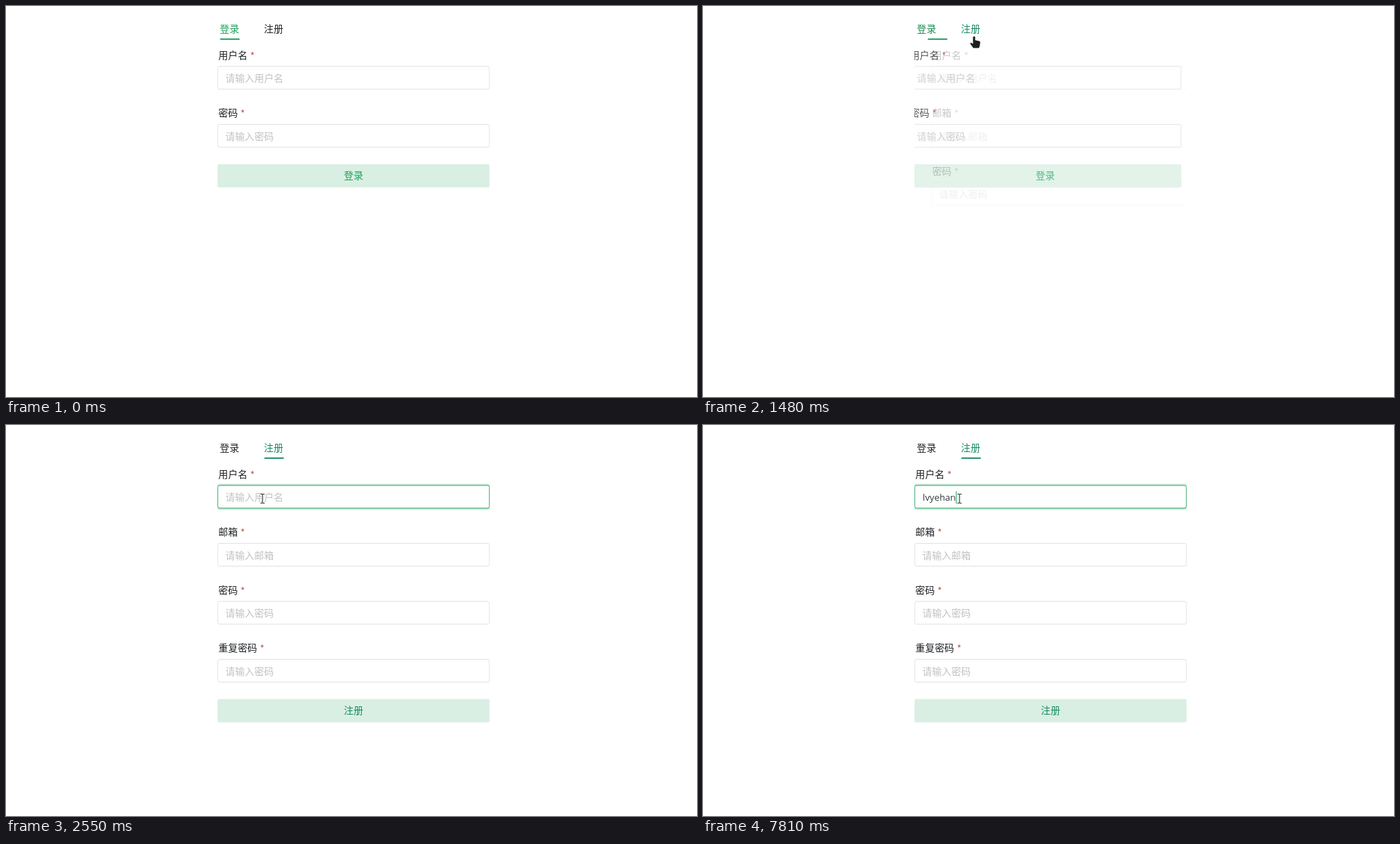
Animation of 994x563 px, one loop 8 s. Source, as an HTML page:

```html
<!DOCTYPE html>
<html lang="zh-CN">
<head>
<meta charset="utf-8">
<title>登录 / 注册</title>
<style>
  html, body { margin: 0; width: 100%; height: 100%; overflow: hidden; background: #fff; }
  #stage { position: relative; width: 994px; height: 563px; overflow: hidden; }
  #stage div, #stage svg { position: absolute; white-space: pre; }
  #page {
    left: 0; top: 0; width: 1000px; height: 566px;
    transform: scale(.994); transform-origin: 0 0;
    font: 14px/20px "Noto Sans CJK SC", "Noto Sans CJK", sans-serif; color: #1f2225;
  }
  .tab { top: 22px; }
  #bar { left: 309.5px; top: 47px; width: 28px; height: 2px; }
  #view { left: 306px; top: 61px; width: 394px; overflow: hidden; }
  .pane { left: 0; top: 0; width: 394px; height: 400px; }
  .label { left: 1.4px; }
  .star { position: relative; top: 1px; color: #c4564f; margin-left: 4px; }
  .input {
    left: 0; width: 394px; height: 34px; box-sizing: border-box;
    border: 1px solid #e0e0e6; border-radius: 3px;
  }
  .hint { left: 10.4px; top: 6px; color: #c2c2c2; }
  .button {
    left: 0; width: 394px; height: 34px; border-radius: 3px; background: #daefe3;
    text-align: center; line-height: 33px;
  }
  #typed { left: 11px; top: 6.5px; font: 13.3px/20px "Open Sans", "Noto Sans", sans-serif; color: #33373a; }
  #caret { top: 8px; width: 1px; height: 18px; background: #18a058; }
  #cursor { left: 0; top: 0; overflow: visible; }
</style>
</head>
<body>
<div id="stage">
  <div id="page">
    <div class="tab" id="tabIn" style="left:309.4px">登录</div>
    <div class="tab" id="tabUp" style="left:373.3px">注册</div>
    <div id="bar"></div>
    <div id="view">
      <div class="pane" id="signIn"></div>
      <div class="pane" id="signUp"></div>
    </div>
  </div>
  <svg id="cursor" width="1" height="1">
    <path id="arrow" d="M0 0V15.5L3.6 12.2 6 17.6 8.3 16.6 6 11.3H11Z" fill="#111" stroke="#fff" stroke-width=".8"/>
    <g id="beam" fill="none">
      <path d="M-3 -6.5H-1L0 -5.8 1 -6.5H3M0 -6V6M-3 6.5H-1L0 5.8 1 6.5H3" stroke="#fff" stroke-width="2.4" opacity=".7"/>
      <path d="M-3 -6.5H-1L0 -5.8 1 -6.5H3M0 -6V6M-3 6.5H-1L0 5.8 1 6.5H3" stroke="#2b2d30" stroke-width="1.1"/>
    </g>
    <path id="hand" fill="#1b1f20" d="M-1.6 .6Q0 -1 1.5 .6V5.2L7.4 6.6Q9 7 8.8 8.8L8 13.5 7 16.5H-1.2L-5.4 10.6Q-6 9 -4.4 8.8L-1.6 10.4Z"/>
  </svg>
</div>
<script>
const LOOP = 8000, STEP = 67.2, START = 330, SWITCH = 1422;
const ROW = 84, FIRST = 26;
const $ = id => document.getElementById(id);
const clamp = v => Math.min(1, Math.max(0, v));
const mix = (a, b, p) => a + (b - a) * p;
const ramp = (t, from, ms) => clamp((t - from) / ms);
const GREY = [224, 224, 230], GREEN = [24, 160, 88], HOVER = [54, 165, 110];
const DEEP = [24, 138, 98], INK = [31, 34, 37];
const blend = (a, b, p) => `rgb(${a.map((v, i) => Math.round(mix(v, b[i], p)))})`;

function add(parent, cls, top, html) {
  const el = document.createElement("div");
  el.className = cls;
  el.style.top = top + "px";
  el.innerHTML = html;
  parent.append(el);
  return el;
}

function buildForm(pane, fields, action, color) {
  const inputs = fields.map(([name, hint], i) => {
    const y = FIRST + ROW * i;
    add(pane, "label", y - 27.5, `${name}<span class="star">*</span>`);
    return add(pane, "input", y, `<div class="hint">请输入${hint}</div>`);
  });
  add(pane, "button", ROW * fields.length, action).style.color = `rgb(${color})`;
  return inputs[0];
}

const user = ["用户名", "用户名"], pass = ["密码", "密码"];
const userIn = buildForm($("signIn"), [user, pass], "登录", GREEN);
const userUp = buildForm($("signUp"), [user, ["邮箱", "邮箱"], pass, ["重复密码", "密码"]], "注册", DEEP);
userUp.insertAdjacentHTML("beforeend", '<div id="typed"></div><div id="caret"></div>');
const hint = userUp.querySelector(".hint");

// Standard curve cubic-bezier(.4, 0, .2, 1)
function ease(x) {
  let lo = 0, hi = 1, s = x;
  for (let i = 0; i < 24; i++) {
    s = (lo + hi) / 2;
    const r = 1 - s;
    if (1.2 * s * r * r + .6 * s * s * r + s * s * s < x) lo = s; else hi = s;
  }
  return 3 * s * s - 2 * s * s * s;
}

// step, x, y, pointer shape
const path = [
  [0, 706, 528, "arrow"], [1, 560, 440, "arrow"], [2, 445, 336, "arrow"], [3, 400, 250, "arrow"],
  [4, 380, 195, "beam"], [5, 374, 150, "arrow"], [6, 372, 118, "beam"], [8, 373, 89, "beam"],
  [9, 379, 70, "arrow"], [10, 386, 56, "arrow"], [11, 390, 44, "hand"], [18, 390, 44, "hand"],
  [19, 384, 66, "arrow"], [20, 376, 92, "beam"], [22, 372, 106, "beam"], [25, 372, 106, "beam"], [27, 369, 106, "beam"]
];
const word = "lvyehan";
const keys = [5630, 5760, 5890, 6010, 7480, 7680, 7810];
const blinks = [2030, 2550, 3100, 3560, 4090, 4620, 5150, 5630, 5630, 6560, 7020];

function drawCursor(t) {
  const n = Math.floor((t - START) / STEP);
  $("cursor").style.display = n < 0 ? "none" : "block";
  if (n < 0) return;
  let i = path.length - 1;
  while (path[i][0] > n) i--;
  const a = path[i], b = path[i + 1] || a;
  const p = b === a ? 0 : (n - a[0]) / (b[0] - a[0]);
  $("cursor").style.transform = `translate(${mix(a[1], b[1], p)}px,${mix(a[2], b[2], p)}px)`;
  for (const id of ["arrow", "beam", "hand"]) $(id).style.display = id === a[3] ? "" : "none";
}

function render(time) {
  // The screen refreshes in even steps while things move
  const t = time < START ? time : START + Math.floor((time - START) / STEP + .001) * STEP;
  const p = ease(ramp(t, SWITCH, 200));

  $("tabIn").style.color = blend(GREEN, INK, ramp(t, SWITCH, 300));
  $("tabUp").style.color = blend(INK, DEEP, ramp(t, 990, 150));
  $("bar").style.background = blend(GREEN, DEEP, p);
  $("bar").style.transform = `translateX(${64 * p}px)`;
  $("view").style.height = mix(2 * ROW + 34, 4 * ROW + 34, p) + "px";
  $("signIn").style.transform = `translateX(${-32 * p}px)`;
  $("signIn").style.opacity = 1 - p;
  $("signUp").style.transform = p < 1 ? `translateX(${32 * (1 - p)}px)` : "none";
  $("signUp").style.opacity = p;

  const over = ramp(t, 700, 200) * (1 - ramp(t, 930, 200));
  userIn.style.borderColor = blend(GREY, HOVER, over);
  const focus = ramp(time, 1990, 200);
  userUp.style.borderColor = focus ? blend(HOVER, GREEN, focus) : blend(GREY, HOVER, ramp(t, 1610, 200));
  userUp.style.boxShadow = `0 0 0 2px rgba(24,160,88,${.2 * focus})`;

  const typed = word.slice(0, keys.filter(k => time >= k).length);
  if ($("typed").textContent !== typed) $("typed").textContent = typed;
  hint.style.display = typed ? "none" : "";
  const on = blinks.filter(k => time >= k).length % 2 === 1;
  $("caret").style.display = on ? "" : "none";
  $("caret").style.left = 11 + $("typed").offsetWidth + "px";
  drawCursor(time);
}

const origin = performance.now();
function tick() {
  render((performance.now() - origin) % LOOP);
  requestAnimationFrame(tick);
}
tick();
</script>
</body>
</html>
```
